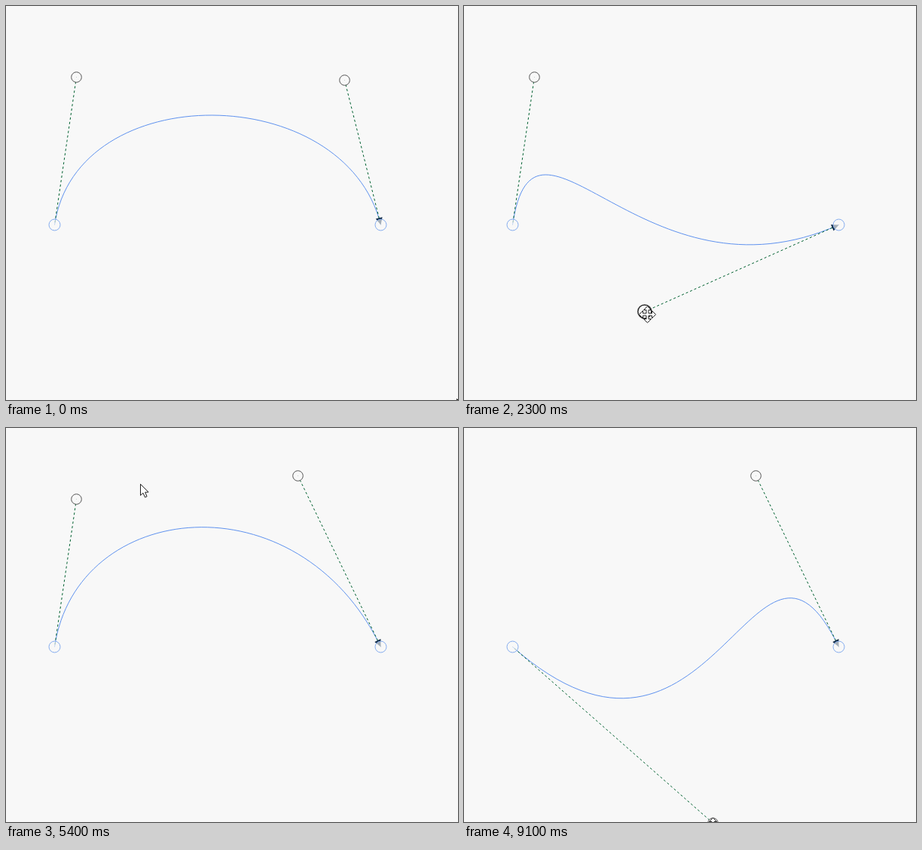
An HTML page with a canvas for the animation above (9.6 s loop, 600 by 523 pixels).

```html
<!DOCTYPE html>
<html lang="en">
<head>
<meta charset="utf-8">
<title>Bezier handles</title>
<style>
  html, body { margin: 0; width: 100%; height: 100%; overflow: hidden; background: #f8f8f8; }
  canvas { display: block; }
</style>
</head>
<body>
<canvas id="stage" width="600" height="523"></canvas>
<script>
const ctx = document.getElementById('stage').getContext('2d');
const LOOP = 9600, STEP = 100;
const PAPER = '#f8f8f8', BLUE = '#5f92ef', GREEN = '#00602f', INK = '#0b2540';
const start = [64, 290], end = [497, 290];
const grip = [3.5, 4];

const easeIn = p => k => k ** p;
const easeOut = p => k => 1 - (1 - k) ** p;
const smooth = k => k * k * (3 - 2 * k);

// A move leads to a point between two times; "via" bends its path.
const move = (from, until, to, ease, via) => ({ from, until, to, ease, via });

const pull = easeIn(1.6), settle = easeOut(1.5);
const leftPath = {
  at: [93, 94],
  moves: [
    move(6300, 7300, [247, 488], pull),
    move(7300, 7600, [330, 524], settle)
  ]
};
const rightPath = {
  at: [449, 98],
  moves: [
    move(1300, 2800, [229, 505], easeOut(1.71), [249, 156]),
    move(3100, 4100, [234.5, 4], smooth),
    move(4400, 5000, [387, 63], smooth)
  ]
};
const pointerPath = {
  at: [598, 521],
  moves: [
    move(0, 800, [453, 102], easeOut(2)),
    move(5000, 5100, [391, 67], smooth),
    move(5100, 5800, [87, 84], easeOut(2.15), [239, 64]),
    move(6000, 6100, [89, 97], smooth),
    move(6300, 7300, [250, 494], pull),
    move(7300, 7600, [330, 528], settle)
  ]
};

const within = (t, a, b) => t >= a && t < b;
const mix = (a, b, k) => a.map((v, i) => v + (b[i] - v) * k);

function locate(path, t) {
  let p = path.at;
  for (const m of path.moves) {
    if (t < m.from) break;
    const k = m.ease(Math.min(1, (t - m.from) / (m.until - m.from)));
    p = m.via ? mix(mix(p, m.via, k), mix(m.via, m.to, k), k) : mix(p, m.to, k);
  }
  return p;
}

function ring([x, y], r, width, color, fill) {
  ctx.beginPath();
  ctx.arc(x, y, r, 0, Math.PI * 2);
  ctx.fillStyle = fill;
  ctx.fill();
  ctx.lineWidth = width;
  ctx.strokeStyle = color;
  ctx.stroke();
}

function handle(p, active) {
  if (active) ring(p, 9, 1.5, '#2c2c2c', PAPER);
  else ring(p, 6.8, 1, '#555', PAPER);
  ctx.fillStyle = '#c4d2ca';
  ctx.fillRect(p[0] - 0.5, p[1] - 0.5, 1, 1);
}

function guide(a, b) {
  ctx.setLineDash([3, 3]);
  ctx.lineWidth = 1;
  ctx.strokeStyle = GREEN;
  ctx.beginPath();
  ctx.moveTo(...a);
  ctx.lineTo(...b);
  ctx.stroke();
  ctx.setLineDash([]);
}

function curve(left, right) {
  ctx.lineWidth = 1;
  ctx.strokeStyle = BLUE;
  ctx.beginPath();
  ctx.moveTo(...start);
  ctx.bezierCurveTo(...left, ...right, ...end);
  ctx.stroke();
}

function arrowhead(from) {
  ctx.save();
  ctx.translate(...end);
  ctx.rotate(Math.atan2(end[1] - from[1], end[0] - from[0]));
  ctx.fillStyle = INK;
  ctx.beginPath();
  ctx.moveTo(0, 0);
  ctx.lineTo(-9.5, -4.5);
  ctx.lineTo(-9.5, 4.5);
  ctx.fill();
  ctx.restore();
}

function outline(points) {
  ctx.beginPath();
  points.forEach(p => ctx.lineTo(...p));
  ctx.closePath();
  ctx.fillStyle = '#fff';
  ctx.fill();
  ctx.lineWidth = 1;
  ctx.strokeStyle = '#222';
  ctx.stroke();
}

function moveCursor() {
  const arm = [[-1.5, -1.5], [-1.5, -6], [-5, -6], [0, -11], [5, -6], [1.5, -6]];
  const points = [];
  for (let q = 0; q < 4; q++) {
    const c = Math.cos(q * Math.PI / 2), s = Math.sin(q * Math.PI / 2);
    arm.forEach(([x, y]) => points.push([x * c - y * s, x * s + y * c]));
  }
  outline(points);
}

function arrowCursor() {
  outline([[0, 0], [0, 15], [3.5, 11.8], [6, 17.5], [8.6, 16.4], [6.2, 10.8], [10.6, 10.6]]);
}

function pointer(t, right) {
  const dragging = within(t, 1300, 5100);
  const [x, y] = dragging ? right.map((v, i) => v + grip[i]) : locate(pointerPath, t);
  ctx.save();
  ctx.translate(Math.round(x), Math.round(y));
  if (t < 700 || within(t, 5200, 6100)) arrowCursor();
  else moveCursor();
  ctx.restore();
}

function draw(now) {
  const t = Math.floor(now % LOOP / STEP) * STEP;
  const left = locate(leftPath, t), right = locate(rightPath, t);
  ctx.setTransform(1, 0, 0, 1, 0, 0);
  ctx.fillStyle = PAPER;
  ctx.fillRect(0, 0, 600, 523);
  ctx.translate(0.5, 0.5);
  curve(left, right);
  guide(left, start);
  guide(right, end);
  arrowhead(right);
  [start, end].forEach(p => ring(p, 7.5, 1, '#84acef', 'rgba(248,248,248,0.65)'));
  handle(left, within(t, 6200, 8900));
  handle(right, within(t, 1200, 5200));
  pointer(t, right);
}

const origin = performance.now();
function tick() {
  draw(performance.now() - origin);
  requestAnimationFrame(tick);
}
tick();
</script>
</body>
</html>
```
